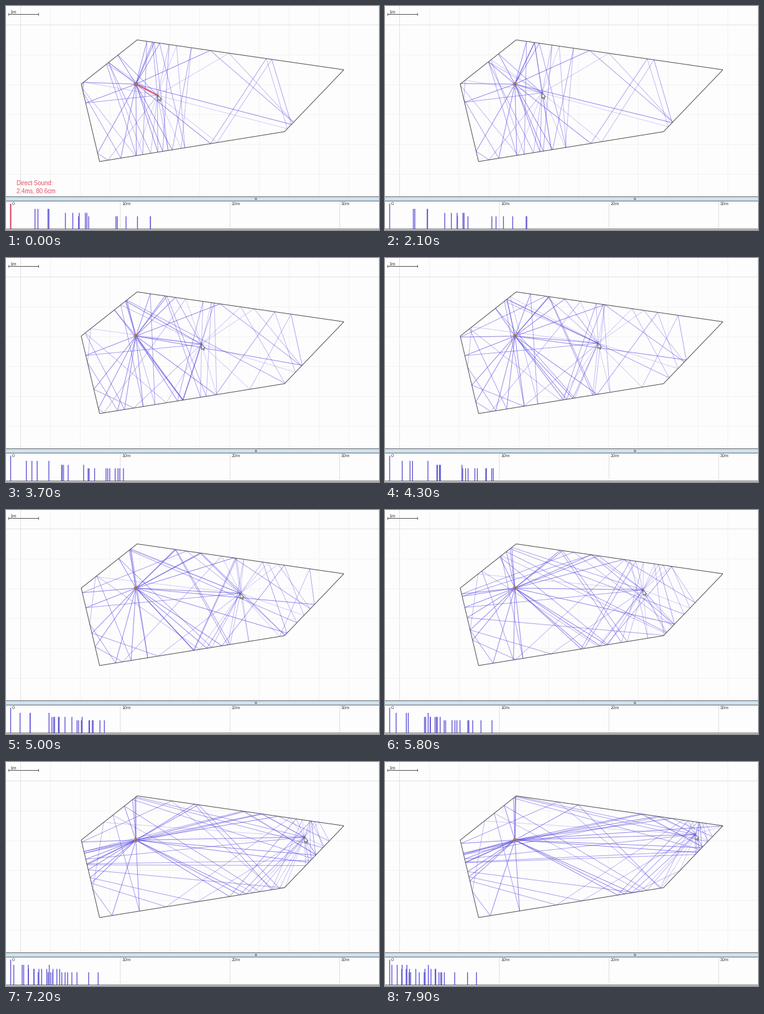
Animation, 600 px wide and 360 px high, one loop 8000 ms. Source, as a matplotlib script:

```python
import itertools

import matplotlib.pyplot as plt
import numpy as np
from matplotlib.animation import FuncAnimation
from matplotlib.collections import LineCollection
from matplotlib.patches import Circle, Polygon, Rectangle

plt.rcParams["path.snap"] = False

W, H, DPI = 600, 360, 100
FRAMES, INTERVAL = 80, 100
PX = 72 / DPI                      # points per pixel

METRE = 48.0                       # room scale, px
TIME_SCALE, TIME_X0 = 17.65, 7.5   # echogram px per metre, origin
BASE = 358
TOPS = [318, 326, 332.5, 338]      # bar top by reflection order
LEG_ALPHA = [0.66, 0.52, 0.38, 0.27]

BLUE = (0.33, 0.28, 0.87)
BAR_BLUE = (0.38, 0.34, 0.84)
RED = (0.89, 0.31, 0.39)
ORANGE = (0.78, 0.52, 0.28)
BROWN = (0.55, 0.48, 0.44)

ROOM = np.array([(211, 54.5), (543.5, 102.5), (448, 202),
                 (150.5, 250), (121, 125.5)])
WALLS = [(ROOM[i], ROOM[(i + 1) % 5]) for i in range(5)]
TOP, RIGHT, BOTTOM, LEFT, SLANT = range(5)
DEAD_END = (SLANT, BOTTOM)         # pair that is not reflected further
SOURCE = np.array([209.0, 125.5])

HOVER_END = 12
REST = np.array([243.5, 143.5])
KNOTS = np.array([16, 21, 37, 50, 58, 66, 79])
PATH = np.array([(244, 143), (252.5, 139.8), (314.5, 138.5), (377, 134),
                 (415, 128.5), (459, 124.2), (499, 116.5)])
SLOPES = np.gradient(PATH, KNOTS, axis=0)
ARROW = np.array([(0, 0), (0, 8.6), (2, 6.8), (3.4, 9.8),
                  (4.7, 9.2), (3.4, 6.3), (5.9, 6.2)])


def mirror(p, wall):
    a, b = wall
    d = (b - a) / np.hypot(*(b - a))
    foot = a + d * np.dot(p - a, d)
    return 2 * foot - p


def cross(u, v):
    return u[0] * v[1] - u[1] * v[0]


def hit(p, q, wall):
    """Point where segment pq crosses the wall, or None."""
    a, b = wall
    r, s = q - p, b - a
    den = cross(r, s)
    if abs(den) < 1e-9:
        return None
    t, u = cross(a - p, s) / den, cross(a - p, r) / den
    if 1e-9 < t < 1 and 0 <= u <= 1:
        return p + t * r
    return None


def build_images(max_order=3):
    """Wall sequences with the chain of mirrored sources for each."""
    result = []
    for order in range(1, max_order + 1):
        for seq in itertools.product(range(5), repeat=order):
            repeats = any(i == j for i, j in zip(seq, seq[1:]))
            if repeats or (order > 2 and seq[:2] == DEAD_END):
                continue
            chain = [SOURCE]
            for w in seq:
                chain.append(mirror(chain[-1], WALLS[w]))
            result.append((seq, chain))
    return result


IMAGES = build_images()


def find_paths(listener):
    paths = [[SOURCE, listener]]
    for seq, chain in IMAGES:
        pts = [listener]
        for w, image in zip(reversed(seq), reversed(chain)):
            p = hit(pts[-1], image, WALLS[w])
            if p is None:
                break
            pts.append(p)
        else:
            paths.append([SOURCE] + pts[::-1])
    return paths


def length(path):
    return sum(np.hypot(*(b - a)) for a, b in zip(path, path[1:]))


def listener_at(i):
    if i < HOVER_END:
        return REST
    if i <= KNOTS[0]:
        return PATH[0]
    k = min(np.searchsorted(KNOTS, i, side="right") - 1, len(KNOTS) - 2)
    h = KNOTS[k + 1] - KNOTS[k]
    t = (i - KNOTS[k]) / h
    return ((1 + 2 * t) * (1 - t) ** 2 * PATH[k]
            + t * (1 - t) ** 2 * h * SLOPES[k]
            + t * t * (3 - 2 * t) * PATH[k + 1]
            + t * t * (t - 1) * h * SLOPES[k + 1])


fig = plt.figure(figsize=(W / DPI, H / DPI), dpi=DPI, facecolor="#fefdfe")
ax = fig.add_axes([0, 0, 1, 1])
ax.set_xlim(0, W)
ax.set_ylim(H, 0)
ax.axis("off")


def line(x0, y0, x1, y1, color, width=1.0, z=1):
    return ax.plot([x0, x1], [y0, y1], color=color, lw=width * PX, zorder=z,
                   solid_capstyle="butt")[0]


def label(x, y, s, size, color="#444444"):
    return ax.text(x, y, s, fontsize=size * PX, color=color, va="baseline",
                   family="Liberation Sans", zorder=8)


# grid
for n in range(13):
    x = 23.5 + 48 * n
    line(x, 0, x, 306, "#e2e1e2" if n == 0 else "#f3f2f3")
for n in range(6):
    y = 30.5 + 48 * n
    line(0, y, W, y, "#e2e1e2" if n == 0 else "#f3f2f3")

# scale bar
line(4.5, 13.5, 52.5, 13.5, "#555555")
for x in (4.5, 52.5):
    line(x, 11.5, x, 15.5, "#555555")
label(6, 11.5, "1m", 7.7)

# echogram panel
ax.add_patch(Rectangle((0, 307), W, 6, fc="#cde2f0", ec="none", zorder=2))
line(0, 306.5, W, 306.5, "#6a6a6a", z=3)
line(0, 313.5, W, 313.5, "#6a6a6a", z=3)
ax.add_patch(Circle((402, 310), 1.4, fc="#b4bcc2", ec="#666666",
                    lw=0.8 * PX, zorder=4))
for n, s in enumerate(["0", "10m", "20m", "30m"]):
    x = 7.5 + 176.4 * n
    line(x, 314, x, BASE, "#dedede", z=2)
    label(x + 2.3, 320.5, s, 7.4)
line(0, 358.5, W, 358.5, "#4a4a4a", z=6)

# room
ax.add_patch(Polygon(ROOM, closed=True, fc="none", ec="#505050",
                     lw=1.0 * PX, zorder=5))
rays = LineCollection([], linewidths=0.95 * PX, zorder=4)
bars = LineCollection([], linewidths=1.4 * PX, colors=[BAR_BLUE],
                      capstyle="butt", zorder=5)
ax.add_collection(rays, autolim=False)
ax.add_collection(bars, autolim=False)

# highlighted direct sound
hover = [
    line(*SOURCE, *REST, RED, 2.0, 6),
    line(TIME_X0, TOPS[0], TIME_X0, BASE, RED, 2.0, 6),
    label(17, 288, "Direct Sound:", 9.6, RED),
    label(17, 300, "2.4ms, 80.6cm", 9.6, RED),
]

source_dot = Circle(SOURCE, 3, fc=(0.5, 0.5, 0.5, 0.55), lw=1.1 * PX,
                    zorder=7)
ear = Circle(REST, 2.4, fc="none", ec=(0.5, 0.5, 0.5, 0.4),
             lw=0.9 * PX, zorder=7)
cursor = Polygon(ARROW, closed=True, fc="white", ec="#5a5a5a",
                 lw=0.9 * PX, zorder=9)
for patch in (source_dot, ear, cursor):
    ax.add_patch(patch)


def draw(i):
    hovering = i < HOVER_END
    pos = listener_at(i)
    legs, colors, ticks = [], [], []
    paths = find_paths(pos)
    direct = length(paths[0])
    for path in paths:
        order = len(path) - 2
        for n, leg in enumerate(zip(path, path[1:])):
            legs.append(leg)
            colors.append(BLUE + (LEG_ALPHA[n],))
        x = TIME_X0 + (length(path) - direct) / METRE * TIME_SCALE
        ticks.append([(x, TOPS[order]), (x, BASE)])
    rays.set_segments(legs)
    rays.set_color(colors)
    bars.set_segments(ticks)

    for artist in hover:
        artist.set_visible(hovering)
    source_dot.set_edgecolor(BROWN if hovering else ORANGE)
    ear.center = tuple(pos)
    settle = max(0, 2 - i) * 0.4
    cursor.set_xy(ARROW + pos + (settle, 0))
    return [rays, bars, source_dot, ear, cursor, *hover]


anim = FuncAnimation(fig, draw, frames=FRAMES, interval=INTERVAL,
                     init_func=lambda: draw(0), repeat=True, repeat_delay=0,
                     blit=False)
plt.show()
```
